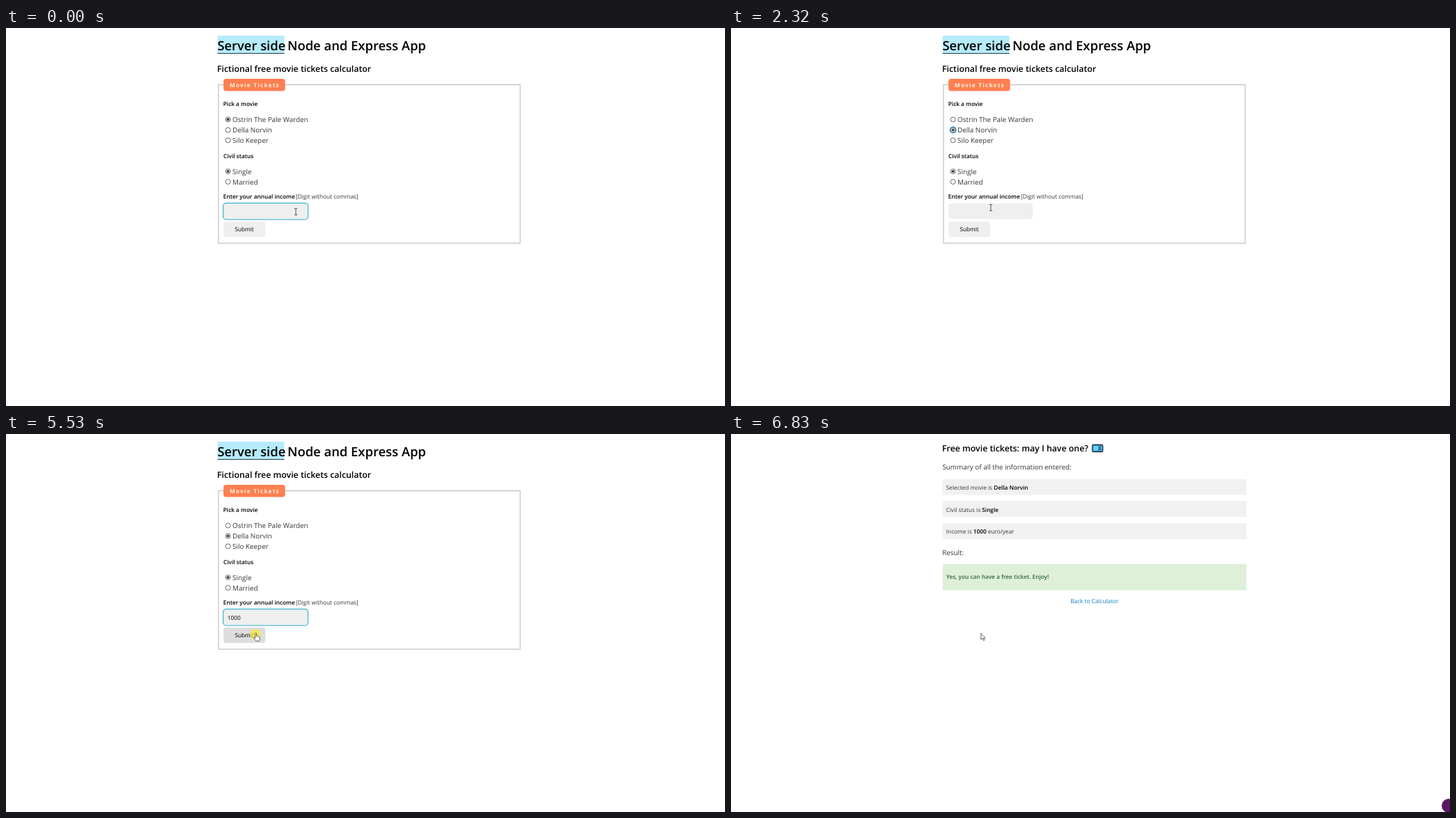
These frames come from a looping animation (1032x543 px, 7760 ms). An HTML page:

```html
<!DOCTYPE html>
<html lang="en">
<head>
<meta charset="utf-8">
<title>Movie ticket form</title>
<style>
  html, body { margin: 0; width: 100%; height: 100%; overflow: hidden; background: #fff; }
  svg { display: block; width: 100vw; height: 100vh; }
  text { font: 8.27px "Open Sans", "Noto Sans", sans-serif; fill: #363636; text-rendering: geometricPrecision; white-space: pre; }
  .h1 { font-size: 18.4px; font-weight: 600; fill: #000; }
  .h2 { font-size: 12.34px; font-weight: 600; fill: #000; }
  .body { font-size: 9.9px; }
  .strong { font-size: 8.25px; font-weight: 600; fill: #000; }
  .dark { fill: #000; }
  .legend { font-size: 8.2px; font-weight: 700; letter-spacing: 1.25px; fill: #fff3dc; }
  .ring { fill: none; stroke: #55b9d3; stroke-width: 1.4; }
  .outline { fill: #fff; stroke: #333; stroke-width: .75; stroke-linejoin: round; }
</style>
</head>
<body>
<svg viewBox="0 0 1032 543" xmlns="http://www.w3.org/2000/svg">
  <rect width="1032" height="543" fill="#fff"/>

  <g id="form">
    <rect x="303.7" y="11" width="95.8" height="25.6" fill="#b5ebfd"/>
    <path d="M303.7 36.5H399.5" stroke="#2b3a42" stroke-width="1"/>
    <text class="h1" x="303.4" y="31.5">Server side</text>
    <text class="h1" x="404" y="31.5">Node and Express App</text>
    <text class="h2" x="303" y="62.6">Fictional free movie tickets calculator</text>
    <rect x="305" y="81.6" width="433" height="227.5" fill="none" stroke="#b4b4b4" stroke-width="1"/>
    <rect x="312.2" y="73" width="88.4" height="17.6" rx="3.6" fill="#ff7f50"/>
    <text class="legend" x="321" y="85.2">Movie Tickets</text>

    <text class="strong" x="311.8" y="111.9">Pick a movie</text>
    <text class="body" x="325" y="134.8">Ostrin The Pale Warden</text>
    <text class="body" x="325" y="150">Della Norvin</text>
    <text class="body" x="325" y="164.9">Silo Keeper</text>
    <text class="strong" x="312" y="186.8">Civil status</text>
    <text class="body" x="325" y="209.6">Single</text>
    <text class="body" x="325" y="224.5">Married</text>
    <g id="radios"></g>

    <text class="strong" x="311.8" y="244.5">Enter your annual income</text>
    <text x="416" y="244.5">[Digit without commas]</text>
    <rect x="312.2" y="252" width="120.8" height="22.6" rx="4" fill="#efefef"/>
    <rect id="inputRing" class="ring" x="311.7" y="251.5" width="121.8" height="23.6" rx="4.3"/>
    <text id="income" class="dark" x="317.8" y="266.9"></text>
    <rect id="caret" y="257.5" width=".9" height="11.5" fill="#111"/>

    <g id="button">
      <rect id="buttonFace" x="312.2" y="278" width="60" height="22.2" rx="4"/>
      <rect id="buttonRing" class="ring" x="311.7" y="277.5" width="61" height="23.2" rx="4.3"/>
      <text class="dark" x="328.4" y="292.4">Submit</text>
    </g>
  </g>

  <g id="result">
    <text class="h2" x="303" y="25">Free movie tickets: may I have one?</text>
    <g stroke="#1d2730">
      <rect x="518.6" y="15.5" width="15" height="10" rx="1.6" fill="#40b9ef" stroke-width="1.3"/>
      <rect x="521" y="17.8" width="6.2" height="5.4" fill="#6fd0f7" stroke="none"/>
      <path d="M529.8 17V24.4" stroke-width="1.5" stroke-dasharray="1.3 1"/>
      <path d="M528 18V23.5" stroke-width=".7"/>
    </g>
    <text class="body" x="303.4" y="50.6">Summary of all the information entered:</text>
    <g fill="#f1f1f1">
      <rect x="303.7" y="64.7" width="436" height="22.8" rx="1.2"/>
      <rect x="303.7" y="96.3" width="436" height="23" rx="1.2"/>
      <rect x="303.7" y="128.2" width="436" height="22.8" rx="1.2"/>
    </g>
    <text x="308.8" y="79.8">Selected movie is <tspan class="strong">Della Norvin</tspan></text>
    <text x="308.8" y="111.5">Civil status is <tspan class="strong">Single</tspan></text>
    <text x="308.8" y="143.2">Income is <tspan class="strong">1000</tspan> euro/year</text>
    <text class="body" x="303.2" y="173.6">Result:</text>
    <rect x="303.7" y="186.8" width="436" height="37.8" rx="1.2" fill="#dff0d8"/>
    <text class="strong" x="309" y="208" style="fill:#346548">Yes, you can have a free ticket. Enjoy!</text>
    <text x="521.8" y="243" text-anchor="middle" style="fill:#0f7ac4">Back to Calculator</text>
    <circle cx="1030" cy="534" r="10" fill="#5a1763"/>
  </g>

  <circle id="press" r="7.4" fill="#f7e92f" opacity=".75"/>
  <g id="cursor">
    <path id="arrow" class="outline" d="M0 0V9.2L2.1 7.3L3.6 10.5L5 9.9L3.6 6.8H6.4Z"/>
    <path id="beam" d="M-2.1 -4.6H-.6L0 -4.1L.6 -4.6H2.1M0 -4.1V4.1M-2.1 4.6H-.6L0 4.1L.6 4.6H2.1" fill="none" stroke="#333" stroke-width=".85"/>
    <path id="hand" class="outline" d="M-.9 0Q0 -1.4 .9 0V4.2Q2 3.5 2.6 4.6Q3.8 4 4.2 5.1Q5.6 4.8 5.6 6.2V8.6Q5.4 10 4.6 11.2H.2Q-.8 9.4 -2.6 7.4Q-3.3 6 -2 6L-.9 7Z"/>
  </g>
</svg>
<script>
const LOOP = 7760;
const $ = id => document.getElementById(id);
const show = (id, on) => $(id).setAttribute('display', on ? 'inline' : 'none');
const within = (t, from, to) => t >= from && t < to;

// Pointer samples: start time, shape, x, y
const pointer = [
  [0, 'beam', 416, 264], [70, 'beam', 416, 263.3],
  [240, 'beam', 412, 257], [310, 'arrow', 393, 222], [390, 'arrow', 366, 172],
  [460, 'arrow', 355, 151], [530, 'arrow', 352.5, 146.5],
  [1170, 'arrow', 352.5, 151], [1240, 'arrow', 352, 166], [1320, 'arrow', 351, 188],
  [1390, 'arrow', 350, 203], [1470, 'arrow', 349, 208],
  [1700, 'arrow', 352, 218], [1780, 'arrow', 360, 244], [1850, 'beam', 363.5, 255.5],
  [2170, 'beam', 366.5, 256], [2240, 'beam', 371, 257.3], [2320, 'beam', 373, 258],
  [4060, 'beam', 384.3, 254], [4900, 'beam', 374, 266],
  [4980, 'beam', 365, 271], [5060, 'arrow', 356, 277], [5130, 'hand', 351, 282],
  [5210, 'hand', 352, 285], [5290, 'hand', 356, 286], [5360, 'hand', 358.6, 286.2],
  [6750, 'arrow', 358.8, 286.2]
];

function radio(y, { on, hover, focus }) {
  const color = hover ? '#0f76c2' : '#444';
  return (focus ? `<circle cx="318.7" cy="${y}" r="4.3" fill="none" stroke="#2aa5c6" stroke-width="1.5"/>` : '')
    + `<circle cx="318.7" cy="${y}" r="3.5" fill="#fff" stroke="${color}" stroke-width=".8"/>`
    + (on ? `<circle cx="318.7" cy="${y}" r="2.1" fill="${color}"/>` : '');
}

function draw(t) {
  show('form', t < 6830);
  show('result', t >= 6830);

  const picked = t >= 780;
  $('radios').innerHTML =
    radio(131.4, { on: !picked }) +
    radio(146.5, { on: picked, hover: within(t, 460, 1240), focus: within(t, 780, 2560) }) +
    radio(161.3, {}) +
    radio(206, { on: true, hover: within(t, 1390, 1700) }) +
    radio(220.9, {});

  show('inputRing', t < 780 || within(t, 2560, 5600));
  $('income').textContent = t < 3020 ? '' : t < 3110 ? '100' : '1000';
  show('caret', within(t, 2560, 3020) || within(t, 3580, 4060) || within(t, 4580, 5060));
  $('caret').setAttribute('x', t < 3020 ? 318 : 337);

  $('buttonFace').setAttribute('fill', t >= 5210 ? '#ddd' : '#efefef');
  $('button').setAttribute('transform', `translate(0 ${within(t, 5600, 5680) ? 1.3 : 0})`);
  show('buttonRing', t >= 5600);

  const [, shape, x, y] = pointer.findLast(p => p[0] <= t);
  $('cursor').setAttribute('transform', `translate(${x} ${y})`);
  for (const id of ['arrow', 'beam', 'hand']) show(id, id === shape);
  $('press').setAttribute('cx', x - .6);
  $('press').setAttribute('cy', y + 1.6);
  show('press', within(t, 700, 940) || within(t, 2490, 2640) || within(t, 5530, 5750));
}

const start = performance.now();
function tick() {
  draw((performance.now() - start) % LOOP);
  requestAnimationFrame(tick);
}
tick();
</script>
</body>
</html>
```
